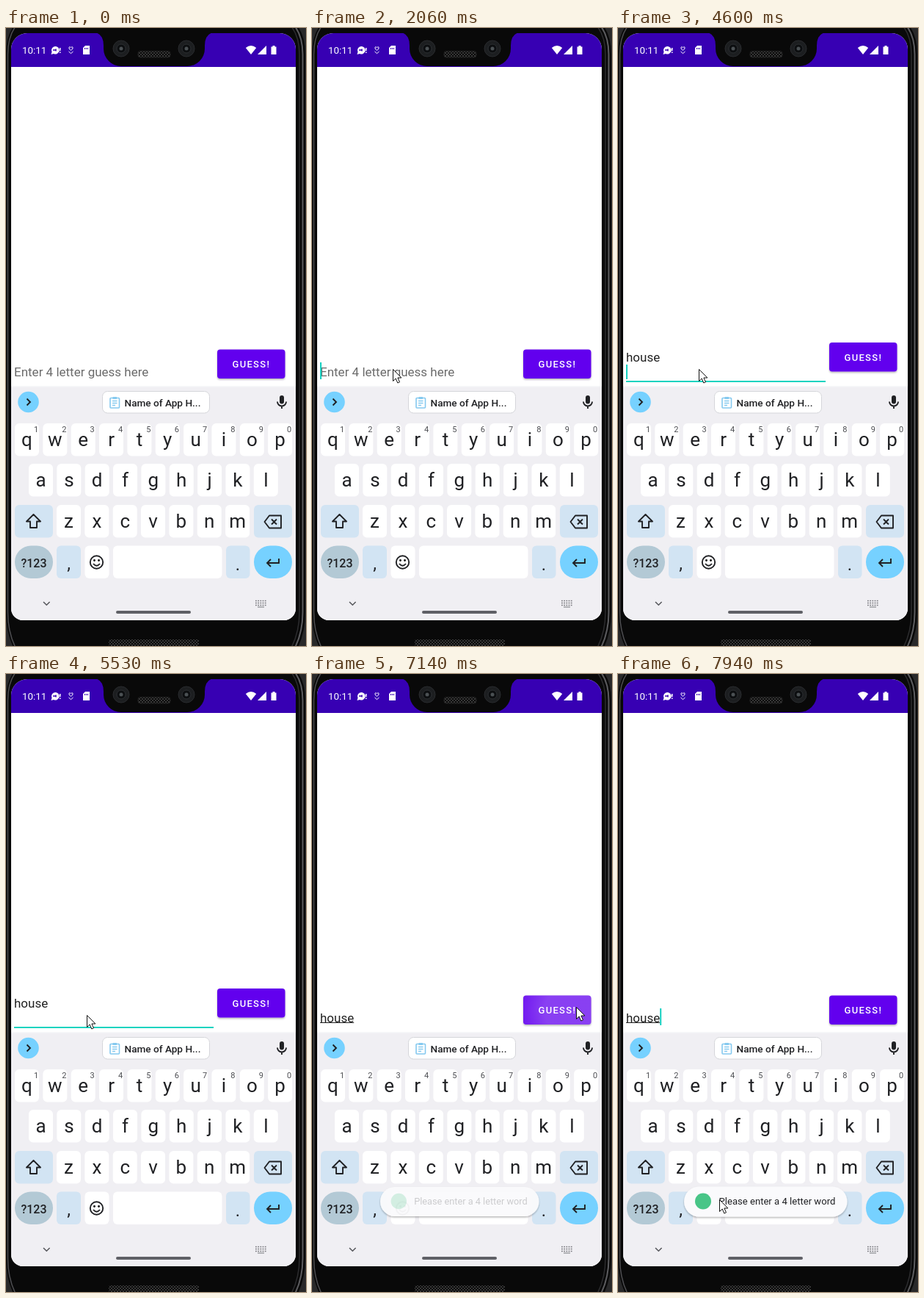
An HTML page for the animation above (8000 ms loop, 409 by 841 pixels).

```html
<!DOCTYPE html>
<html lang="en">
<head>
<meta charset="utf-8">
<title>Word guess</title>
<style>
html, body { margin: 0; width: 100%; height: 100%; overflow: hidden; background: #000; }
svg { display: block; width: 409px; height: 841px; font-family: Roboto, sans-serif; }
.line { fill: none; stroke: #202124; stroke-width: 1.9; }
.mid { text-anchor: middle; }
</style>
</head>
<body>
<svg viewBox="0 0 409 841">
  <defs>
    <clipPath id="screen"><path d="M7 29a22 22 0 0 1 22-22H373a22 22 0 0 1 22 22V790a16 16 0 0 1-16 16H23a16 16 0 0 1-16-16z"/></clipPath>
    <radialGradient id="glow" gradientUnits="userSpaceOnUse" cx="350" cy="458" r="66">
      <stop offset="0.5" stop-color="#fff" stop-opacity=".25"/>
      <stop offset="1" stop-color="#fff" stop-opacity=".09"/>
    </radialGradient>
    <pattern id="mesh" width="4" height="4" patternUnits="userSpaceOnUse">
      <path d="M0 0L4 4M4 0L0 4" stroke="#3c3c3c" stroke-width=".9"/>
    </pattern>
    <filter id="shadow" x="-10%" y="-30%" width="120%" height="180%">
      <feDropShadow dx="0" dy="1.5" stdDeviation="1.3" flood-opacity=".3"/>
    </filter>
  </defs>

  <!-- Phone body -->
  <rect width="409" height="841" fill="#29292a"/>
  <path d="M10 -2Q0 12 0 36V795Q0 822 10 843H398Q408 822 408 795V36Q408 12 398 -2z" fill="#090909"/>
  <g fill="none" stroke-width="1.500">
    <path d="M13 -2Q2.500 12 2.500 36V795Q2.500 822 13 843" stroke="#4d4d50"/>
    <path d="M389 -2Q400 12 400 36V795Q400 822 389 843" stroke="#2c2c2e"/>
    <path d="M394 -2Q404.500 12 404.500 36V795Q404.500 822 394 843" stroke="#5c5c5f" stroke-width="2"/>
  </g>

  <g clip-path="url(#screen)">
    <rect x="7" y="7" width="388" height="799" fill="#fff"/>
    <rect x="7" y="7" width="388" height="46" fill="#3700b3"/>
    <path d="M121 6Q133 8 133 24V28a24 24 0 0 0 24 24H247a24 24 0 0 0 24-24V24Q271 8 283 6z" fill="#090909"/>

    <!-- Status bar -->
    <g fill="#fff">
      <text x="22" y="35" font-size="13.400">10:11</text>
      <path d="M67 25a5.300 5.300 0 1 1-2 10l-3.500 1 1-3.500A5.300 5.300 0 0 1 67 25zM73 27h1.500v4H73zM73 32.500h1.500V34H73z"/>
      <path d="M64 30h4m0-1.500v3" stroke="#3700b3" stroke-width="1.500"/>
      <path d="M88.500 30.500l-2.500-2.500q-.6-2.300 1.200-2.300l1.300 1 1.300-1q1.800 0 1.200 2.300zM85.500 32l3 2.700 3-2.700" fill="none" stroke="#fff"/>
      <path d="M108 24h6v12h-9V27z"/>
      <path d="M107.500 27v2m2-2v2m2-2v2" stroke="#3700b3"/>
      <path d="M326.800 27Q334 21 341.200 27L334 36z"/>
      <path d="M355 24V36H343z"/>
      <path d="M363.500 24h3v1.500h2V36h-7V25.500h2z"/>
    </g>

    <!-- Text field -->
    <text id="hint" x="11" y="473.500" font-size="17" fill="#6b6b6b">Enter 4 letter guess here</text>
    <text id="typed" x="11" font-size="17" fill="#212121"></text>
    <rect id="composing" x="11" y="474" height="1" fill="#212121"/>
    <rect id="fieldLine" x="11" y="480" width="272" height="2" fill="#14d3c0"/>
    <rect id="caret" width="2" fill="#14cfc0"/>

    <g id="button">
      <rect x="288" y="437.500" width="92.500" height="39.500" rx="4" fill="#6200ee" filter="url(#shadow)"/>
      <rect id="ripple" x="288" y="437.500" width="92.500" height="39.500" rx="4" fill="url(#glow)"/>
      <text x="308.500" y="462.300" font-size="13" font-weight="500" letter-spacing="1.300" fill="#fff">GUESS!</text>
    </g>

    <!-- Keyboard -->
    <rect x="7" y="487" width="388" height="2" fill="#f7f7f9"/>
    <rect x="7" y="488.500" width="388" height="318" fill="#f0eff3"/>
    <circle cx="30.500" cy="509" r="14.300" fill="#76d1ff"/>
    <path class="line" d="M28.500 504.500l4.500 4.500-4.500 4.500"/>
    <rect x="131.500" y="494.500" width="146" height="29.500" rx="7" fill="#fff" stroke="#d5d6da"/>
    <g fill="none" stroke="#85c9ef" stroke-width="1.600">
      <rect x="142" y="503.500" width="12.500" height="13.500" rx="1"/>
      <path d="M145 507.500h6.500M145 510.500h6.500M145 513.500h4"/>
    </g>
    <path d="M145.500 502h5.500v3h-5.500z" fill="#85c9ef"/>
    <text x="161.500" y="515" font-size="13.600" font-weight="500" fill="#202124">Name of App H...</text>
    <rect x="373" y="500" width="6" height="11.500" rx="3" fill="#202124"/>
    <path class="line" d="M370 508.500a6 6 0 0 0 12 0M376 514.500v3.500"/>

    <g id="keys"></g>

    <path class="line" d="M37.500 662l-9.500 9.500h5v8.500h9v-8.500h5z" stroke-linejoin="round"/>
    <path class="line" d="M359 663.500h16v17h-16l-6.500-8.500zM362 668.500l7 7m0-7l-7 7" stroke-linejoin="round"/>
    <circle class="line" cx="123.500" cy="727" r="8.700"/>
    <path class="line" d="M119 729q4.500 5.500 9 0"/>
    <circle cx="120.500" cy="724.500" r="1.400"/>
    <circle cx="126.500" cy="724.500" r="1.400"/>
    <path class="line" d="M372 722v6h-16m5-5l-5 5 5 5"/>
    <path d="M51 781l4.300 4.300 4.300-4.300" fill="none" stroke="#55565b" stroke-width="1.500"/>
    <path d="M340 779.500h15m-15 3h15m-15 3h15" stroke="#77787d" stroke-width="1.600" stroke-dasharray="1.800 1.400"/>
    <path d="M343 788h9" stroke="#77787d" stroke-width="1.200"/>
    <rect x="150" y="793" width="102" height="4" rx="2" fill="#5f6066"/>

    <g id="toast">
      <rect id="toastBack" x="90" y="697.500" width="222.500" height="41" rx="20.500" fill="#fafafc" filter="url(#shadow)"/>
      <g id="toastBody">
        <circle cx="116" cy="717.500" r="11" fill="#48c587"/>
        <text x="137.500" y="722" font-size="13.100" fill="#202124">Please enter a 4 letter word</text>
      </g>
    </g>
  </g>

  <!-- Cameras and speakers -->
  <g id="cameras"></g>
  <rect x="180" y="31.500" width="44" height="8.500" rx="3" fill="url(#mesh)" stroke="#222"/>
  <rect x="140" y="832" width="123" height="9" rx="2" fill="url(#mesh)"/>

  <path id="pointer" d="M.5.500V16.500L4.200 13l2.600 6 2.700-1.200-2.600-5.800h5z" fill="#fff" stroke="#111"/>
</svg>
<script>
const $ = id => document.getElementById(id);
const set = (id, attrs) => { for (const k in attrs) $(id).setAttribute(k, attrs[k]); };
const show = (id, on) => set(id, { visibility: on ? "visible" : "hidden" });

// Static keys
const PITCH = 38.35;
const key = (x, y, w, fill = "#fff", r = 6) =>
  `<rect x="${x}" y="${y}" width="${w}" height="44.500" rx="${r}" fill="${fill}"/>`;
const label = (s, x, y, size, weight = 400, fill = "#202124") =>
  `<text class="mid" x="${x}" y="${y}" font-size="${size}" font-weight="${weight}" fill="${fill}">${s}</text>`;
let keys = "";
[["qwertyuiop", 12, 538], ["asdfghjkl", 31, 593], ["zxcvbnm", 69, 649]].forEach(([row, left, y], r) =>
  [...row].forEach((c, i) => {
    const x = left + i * PITCH;
    keys += key(x, y, 33) + label(c, x + 16.5, y + 30.500, 26);
    if (r === 0) keys += label((i + 1) % 10, x + 29, y + 12, 11, 400, "#4a4b50");
  }));
const BLUE = "#d2e4f3";
keys += key(12, 649, 52, BLUE) + key(338, 649, 52, BLUE)
  + key(12, 704.5, 52, "#b3c9d5", 22) + key(69, 704.5, 33, BLUE) + key(107.5, 704.5, 33)
  + key(146, 704.5, 148.5) + key(300, 704.5, 32.5, BLUE) + key(338, 704.5, 52, "#76d1ff", 22)
  + label("?123", 38, 733.5, 16, 500) + label(",", 85.5, 737, 24) + label(".", 316, 738, 24);
$("keys").innerHTML = keys;

$("cameras").innerHTML = [157, 246].map(x =>
  `<circle cx="${x}" cy="28" r="11" fill="#1c1e20" stroke="#2a2c2f"/>
   <circle cx="${x}" cy="28" r="6" fill="#0c0e10" stroke="#2c2f32"/>
   <circle cx="${x}" cy="28" r="2.500" fill="#4b5154"/>`).join("");

// Timeline: [time, value...]
const LOOP = 8000;
const pointerPath = [
  [70, 246, 751], [400, 242, 600], [730, 230, 455], [810, 230, 455], [870, 267, 504],
  [1000, 150, 470], [1070, 110, 464], [6230, 110, 464], [6400, 406, 462], [6470, 406, 462],
  [6670, 360, 453], [7300, 360, 453], [7670, 246, 822], [7730, 246, 822], [7930, 138, 715]
];
const ripple = [[6860, 0], [7000, 1], [7400, 1], [7850, 0]];
const toastIn = [[7040, 0], [7260, 1]];
const caretFlips = [70, 530, 1000, 1530, 2060, 3330, 3790, 4320, 4530, 5130, 5600, 6070, 6600, 7130, 7670];
const typing = [[0, 0], [2190, 1], [2260, 2], [2330, 3], [2590, 5]];
const marks = [[0, 0], [2190, 1], [2260, 2], [2330, 3], [2590, 4], [2790, 5]];
const advance = [0, 9.4, 19, 28.4, 37.2, 46.2];

const latest = (steps, t) => steps.filter(s => s[0] <= t).pop()[1];
function tween(path, t) {
  if (t <= path[0][0]) return path[0].slice(1);
  const i = path.findIndex(p => p[0] > t);
  if (i < 0) return path[path.length - 1].slice(1);
  const [a, b] = [path[i - 1], path[i]];
  const f = (t - a[0]) / (b[0] - a[0]);
  return a.slice(1).map((v, n) => v + (b[n + 1] - v) * f);
}

function draw(t) {
  const twoLines = t >= 4530 && t < 5600;
  const count = latest(typing, t);
  show("hint", count === 0);
  $("typed").textContent = "house".slice(0, count);
  set("typed", { y: twoLines ? 454 : 473.5 });
  set("composing", { width: twoLines ? 0 : advance[latest(marks, t)] });
  show("fieldLine", twoLines);
  show("caret", caretFlips.filter(c => c <= t).length % 2);
  set("caret", {
    x: 11 + (twoLines ? 0 : advance[count]),
    y: twoLines ? 458 : 455,
    height: twoLines ? 20 : 23
  });
  set("button", { transform: `translate(0 ${twoLines ? -9.5 : 0})` });
  set("ripple", { opacity: tween(ripple, t)[0] });

  const [shown] = tween(toastIn, t);
  const scale = 0.95 + 0.05 * shown;
  set("toast", { transform: `translate(201 718) scale(${scale}) translate(-201 -718)` });
  set("toastBack", { opacity: Math.min(1, shown * 2.1) });
  set("toastBody", { opacity: shown ** 2 });

  const [x, y] = tween(pointerPath, Math.floor(t * 0.015 + 0.01) / 0.015);
  show("pointer", t >= 70);
  set("pointer", { transform: `translate(${x} ${y})` });
}

function loop() {
  draw(performance.now() % LOOP);
  requestAnimationFrame(loop);
}
loop();
</script>
</body>
</html>
```
